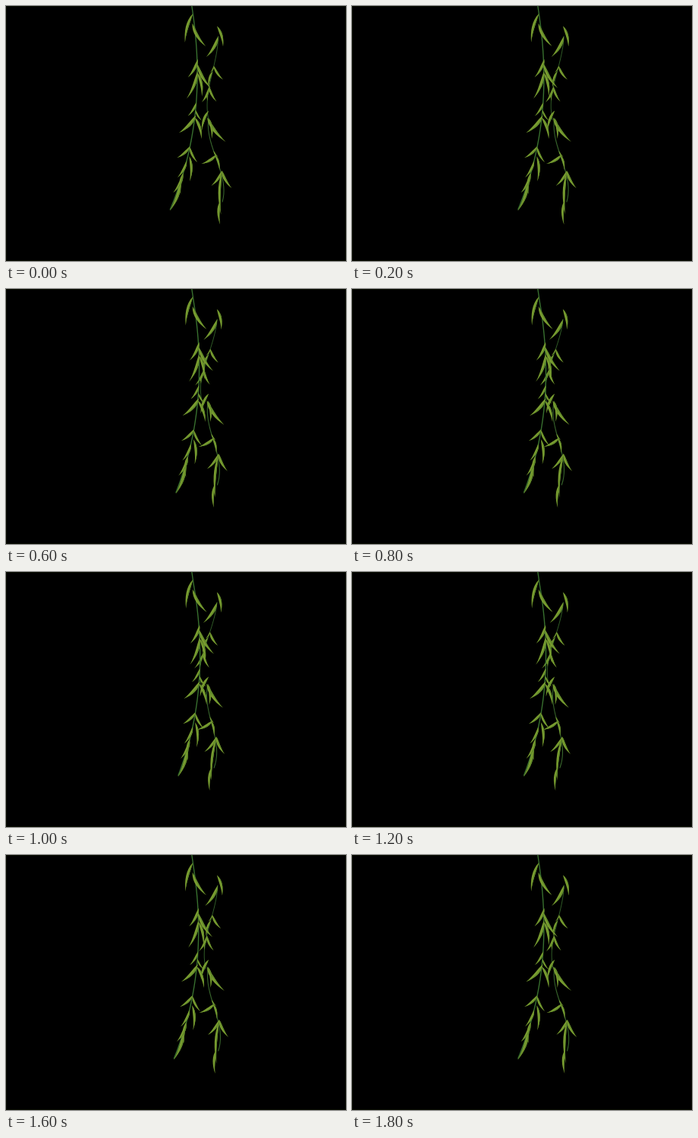
These frames come from a looping animation (448 by 336 pixels, 2000 ms). An HTML page:

```html
<!DOCTYPE html>
<html lang="en">
<head>
<meta charset="utf-8">
<title>Willow twigs</title>
<style>
html, body { margin: 0; width: 100%; height: 100%; overflow: hidden; background: #000; }
svg { display: block; width: 100vw; height: 100vh; }
</style>
</head>
<body>
<svg id="stage" viewBox="0 0 448 336">
  <rect width="448" height="336" fill="#000"/>
  <rect x=".5" y=".5" width="447" height="335" fill="none" stroke="#0a0e03"/>
</svg>
<script>
const LOOP = 2000, STEPS = 10;
const linear = p => p;
const smooth = p => (1 - Math.cos(Math.PI * p)) / 2;

// A stem runs from top to bottom; xs are its Bezier x values.
// It sways by lean * (y - pivot), up to limit, farthest at step peak.
// leaves: [y on stem, tip dx, tip dy, base shift]
const twigs = [
  {
    top: 40, bottom: 150, xs: [279.5, 279.5, 258.7, 267], color: '#2f5a26', width: 1,
    pivot: 25, lean: -.1, limit: 10, peak: 4, gain: 1.15, fall: linear,
    leaves: [
      [26.5, 8, 27, -1.5], [40, -15.5, 27],
      [79, 12, 18], [79, -5, 9], [86, -5.5, 21],
      [106, 9.5, 20], [106, -10, 21], [108, -2, 17]
    ]
  },
  {
    top: 148, bottom: 260, xs: [267, 261.3, 296.6, 284.5], color: '#38652c', width: 1.1,
    pivot: 139, lean: -.094, limit: 14, peak: 5.6, gain: 1.1, fall: smooth,
    leaves: [
      [138, -9, 26], [147, 24.5, 32, -2], [148, 4, 27],
      [191, 6, 8], [196, -20, 12, 2], [196, 6, 20],
      [217, -14, 20, 2], [217, 13, 23, 2], [220, -1, 55, 1],
      [256, -.5, 32, -3]
    ]
  },
  {
    top: -2, bottom: 270, xs: [244.5, 259, 254.5, 215.5], color: '#38702f', width: 1.4,
    pivot: 15, lean: .042, limit: 11, peak: 5, gain: 1.2, fall: linear,
    leaves: [
      [10, -10.5, 38], [23, 17.5, 30, -2.5],
      [70, -13, 24, 1], [76, 18, 32], [86, -14, 36], [88, 6, 31],
      [127, -11, 18], [137, 8, 14], [144, -22, 23, 1], [147, 9, 28],
      [185, -17, 15], [186, 10, 20], [198, .5, 33, 2], [204, -12, 22],
      [220, -3.5, 28], [221, -13, 25], [232, -14, 38]
    ]
  }
];

const stage = document.getElementById('stage');

function addPath(attrs) {
  const p = document.createElementNS('http://www.w3.org/2000/svg', 'path');
  for (const k in attrs) p.setAttribute(k, attrs[k]);
  return stage.appendChild(p);
}

for (const t of twigs) {
  t.line = addPath({ fill: 'none', stroke: t.color, 'stroke-width': t.width, 'stroke-linecap': 'round' });
  t.blade = addPath({ fill: '#7a9c30' });
  t.shade = addPath({ fill: '#5f8929' });
}

const pt = (x, y) => x.toFixed(2) + ' ' + y.toFixed(2) + ' ';

// Share of the full sway at a step
function sway(t, step) {
  const p = step < t.peak ? step / t.peak : t.fall((STEPS - step) / (STEPS - t.peak));
  return Math.min(1, p * t.gain);
}

function stemX(t, y) {
  const p = Math.max(0, Math.min(1, (y - t.top) / (t.bottom - t.top))), q = 1 - p;
  const [a, b, c, d] = t.xs;
  return a * q ** 3 + 3 * b * q * q * p + 3 * c * q * p * p + d * p ** 3;
}

// Area between two curves that share base and tip, fuller near the base
function leafPath(x, y, dx, dy, bow, from, to) {
  const len = Math.hypot(dx, dy);
  const at = (p, k) => pt(x + dx * p - dy / len * k, y + dy * p + dx / len * k);
  const near = w => at(.3, bow + w), far = w => at(.65, bow + w * .4);
  return 'M' + at(0, 0) + 'C' + near(from) + far(from) + at(1, 0) +
    'C' + far(to) + near(to) + at(0, 0) + 'Z';
}

function draw(ms) {
  const step = Math.floor(ms % LOOP / LOOP * STEPS);
  for (const t of twigs) {
    const amount = sway(t, step);
    const shift = y => amount * Math.sign(t.lean) *
      Math.min(t.limit, Math.max(0, Math.abs(t.lean) * (y - t.pivot)));

    let line = '', blade = '', shade = '';
    for (let y = t.top; y <= t.bottom; y += 5) {
      line += (line ? 'L' : 'M') + pt(stemX(t, y) + shift(y), y);
    }
    for (const [y, out, dy, off = 0] of t.leaves) {
      const x = stemX(t, y) + off + shift(y);
      const dx = out + shift(y + dy) - shift(y);
      const len = Math.hypot(out, dy), slant = Math.abs(out) / dy;
      // Slanted leaves flare at the tip, steep ones arch outwards
      const bow = Math.sign(out) * (slant < .35 ? -1 : 1) * Math.min(len * .1, 3.5);
      const w = Math.min(len * .13, 4) * (.75 + .35 * Math.abs(out) / len);
      blade += leafPath(x, y, dx, dy, bow, w, -w);
      shade += leafPath(x, y, dx, dy, bow, -w * .3, -w);
    }
    t.line.setAttribute('d', line);
    t.blade.setAttribute('d', blade);
    t.shade.setAttribute('d', shade);
  }
}

const start = performance.now();
function tick() {
  draw(performance.now() - start);
  requestAnimationFrame(tick);
}
tick();
</script>
</body>
</html>
```
